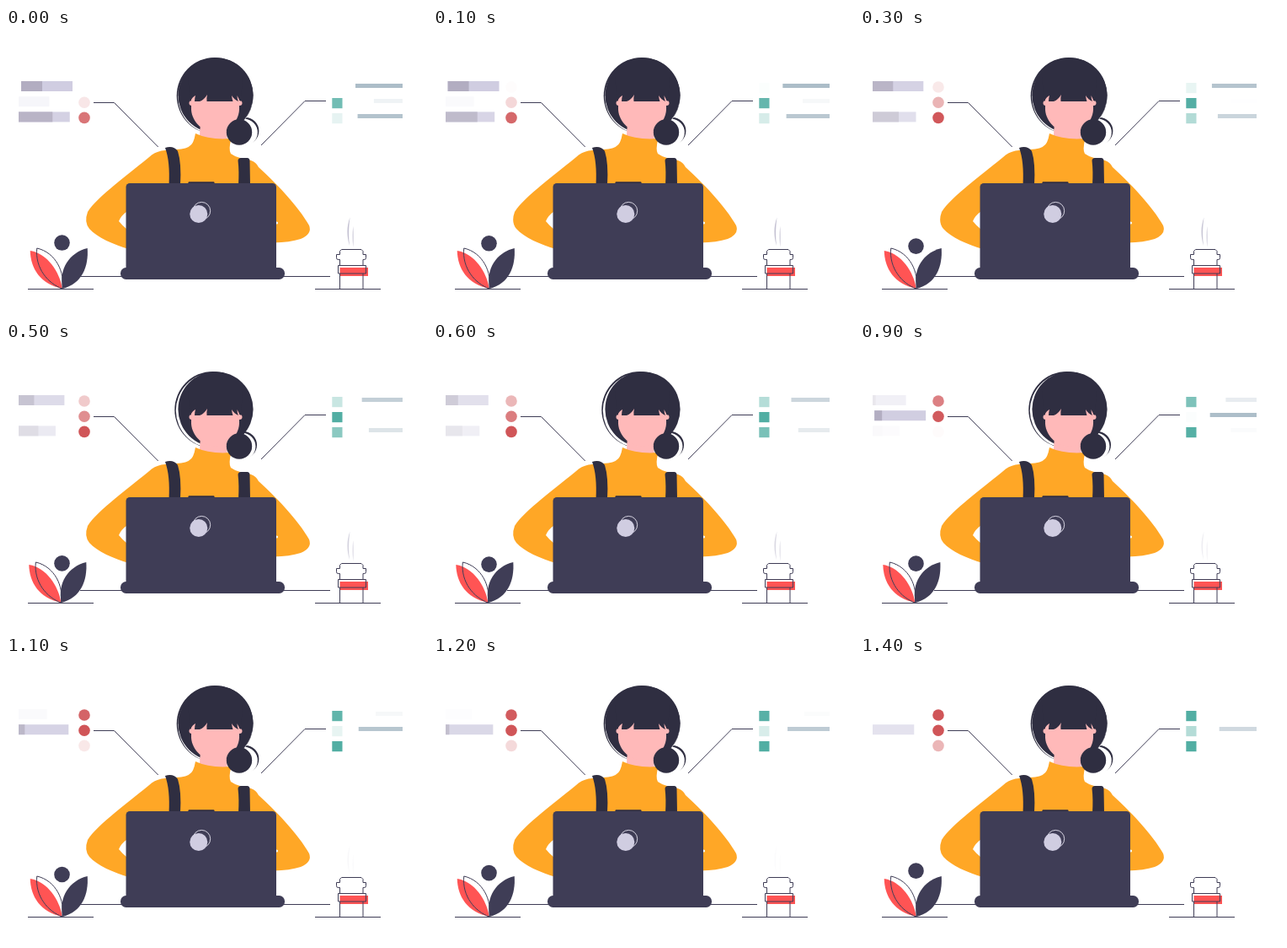
Animation, 500 px wide and 339 px high, one loop 1500 ms. Source, as an HTML page:

```html
<!DOCTYPE html>
<html lang="en">
<head>
<meta charset="utf-8">
<title>Working at a laptop</title>
<style>
html, body { margin: 0; width: 100%; height: 100%; overflow: hidden; background: #fff; }
svg { display: block; width: 100vw; height: 100vh; }
.line { fill: none; stroke: #3f3d56; stroke-width: 1; }
.ink { fill: #3f3d56; }
.hair { fill: #2f2e41; }
.skin { fill: #ffb9b9; }
.white { fill: #fff; }
.red { fill: #ff5454; }
</style>
</head>
<body>
<svg viewBox="0 0 500 339" preserveAspectRatio="none">
  <defs><clipPath id="edge"><rect x="15" y="50" width="80" height="80"/></clipPath></defs>

  <path class="line" d="M88 294.5H385M26 309.5H104M367 309.5H445"/>
  <path class="line" d="M104 88.5H128.5L180.7 141M380 86.5H355L303 139"/>
  <g id="left" clip-path="url(#edge)"></g>
  <g id="right"></g>
  <g id="icons"></g>

  <!-- loose outline behind hair and bun -->
  <g id="shade">
    <circle class="hair" cx="284" cy="122" r="16"/>
    <circle class="white" cx="282.4" cy="123.8" r="16"/>
    <circle class="hair" cx="247.7" cy="80.3" r="45.4"/>
    <circle class="white" cx="248.3" cy="81.2" r="44.5"/>
  </g>
  <circle class="hair" cx="249" cy="79.8" r="44.6"/>

  <path class="skin" d="M231 112L229.5 134H263L261 112Z"/>
  <path class="skin" d="M220 78V97C221 112 235 124 249 124S276 112 277 97V78Z"/>
  <circle class="skin" cx="220.5" cy="89" r="3"/>
  <circle class="skin" cx="277.5" cy="89" r="3"/>
  <path class="hair" d="M216 58H281L279 87Q276 84 274.5 80Q274.500 84 276 87Q271 85 268 80Q268.500 84 269.500 87H238.5Q238 83 239 79Q235 85.5 230 87H224Q224 83 225 80Q221 82 219 87Z"/>

  <path fill="#ffa726" d="M225 125Q242 133 267.5 131Q264 144 267 149Q271 152 278 154L291 157Q297 159 300 165C318 181 348 212 360 234Q364 244 350 250Q337 254 318 254.5V270H146V262C128 257 108 248 99 238Q92.500 230 97 218C108 200 147 172.500 173 150.500Q180 145.500 189 145L208 143.500Q219 142 222 135.500Q224 131 225 125Z"/>
  <path class="white" d="M143 218Q137 222 134 229Q138 234 143 238Z"/>
  <circle class="white" cx="321.5" cy="231" r="1.5"/>
  <circle class="hair" cx="277" cy="123.5" r="15.2"/>

  <path class="hair" d="M189 142Q199 139 204 146Q208.5 160 207 186H193.5Q195 158 189 142Z"/>
  <path class="hair" d="M275.5 157Q276 154 279 154H286.5Q289 154 289.5 157L290 186H276Q277 170 275.5 157Z"/>

  <rect class="hair" x="216.5" y="182.3" width="31" height="4" rx="1"/>
  <rect class="ink" x="142.5" y="184" width="178.5" height="112" rx="4.5"/>
  <rect class="ink" x="136" y="284" width="195" height="14" rx="6.5"/>
  <circle cx="232.3" cy="216.8" r="10.4" fill="none" stroke="#e6e4f0" stroke-width=".9"/>
  <circle cx="228.8" cy="220.5" r="10.5" fill="#d0cde1"/>

  <g id="plant">
    <path class="red" d="M28.5 264C29 285 40 303 66.5 309C64 290 49 267 28.5 264Z"/>
    <path class="line" d="M36.5 261C34 285 50 303 66.5 309C70 290 59 266 36.5 261Z"/>
    <path class="ink" d="M96.5 261C75 266 62 286 67 309C90 303 98 283 96.5 261Z"/>
  </g>
  <circle id="dot" class="ink" cx="66.5" r="9.3"/>

  <rect class="red" x="396.5" y="284" width="33.5" height="10"/>
  <path class="line" d="M396.500 281.500V274.500H394.500Q392.500 274.500 392.500 272.500V268.500H396.500V264.500L398.500 262.500H422L424 264.500V268.500H427.500V272.500Q427.500 274.500 425.500 274.500H424V281.500M394.500 281.500H427.500V291H394.500ZM396.500 291V309M424 291V309"/>
  <g id="steam" fill="#b9b6ca">
    <path d="M408.500 224.500C404 236 405 249 408 258C406.500 246 407 236 408.500 224.500Z"/>
    <path opacity=".6" d="M412.500 235C410.500 245 411.500 253 412.500 260C413.200 252 413.300 244 412.500 235Z"/>
  </g>
</svg>
<script>
const LOOP = 1500, STEP = 100;
const SLIDE = 1400, CYCLE = 1760;   // one row glides for SLIDE, then restarts after CYCLE

const $ = id => document.getElementById(id);

function set(el, attrs) {
  for (const key in attrs) el.setAttribute(key, attrs[key]);
}

function add(parent, tag, attrs = {}) {
  const el = document.createElementNS("http://www.w3.org/2000/svg", tag);
  set(el, attrs);
  return parent.appendChild(el);
}

// Sine ease in and out, 0 to 1, for a row that is ahead by the given lead.
function progress(t, lead) {
  const s = Math.min((t + lead) % CYCLE, SLIDE);
  return (1 - Math.cos(Math.PI * s / SLIDE)) / 2;
}

// Each row: width of its dark part, then the leads of its bars, circle and square.
const rows = [
  { split: 25, bar: 0, circle: 30, square: 30 },
  { split: 9, bar: 1000, circle: 350, square: 1000 },
  { split: 40.5, bar: 280, circle: 1000, square: 350 }
].map((row, i) => {
  const y = 63 + 18.2 * i;
  const left = add($("left"), "g");
  add(left, "rect", { x: 18, y, width: 61, height: 12, fill: "#d0cde1" });
  add(left, "rect", { x: 18, y, width: row.split, height: 12, fill: "#b2adc1" });
  const right = add($("right"), "rect", { y: 66 + 18 * i, height: 5, fill: "#acbdc8" });
  const circle = add($("icons"), "circle", { cx: 93, cy: y + 7, r: 6.8, fill: "#d05558" });
  const square = add($("icons"), "rect", { x: 387.3, y: 65 + 18 * i, width: 12.2, height: 12.2, fill: "#52aea3" });

  return t => {
    const p = progress(t, row.bar), x = 415 + 27 * p;
    set(left, { transform: `translate(${-34 * p} 0)`, opacity: 1 - p });
    set(right, { x, width: 471 - x, opacity: 1 - p });
    set(circle, { opacity: progress(t, row.circle) });
    set(square, { opacity: progress(t, row.square) });
  };
});

function draw(t) {
  rows.forEach(update => update(t));
  const dip = Math.cos(2 * Math.PI * (t - 710) / LOOP);
  const sway = dip > 0 ? -2 : .4;
  set($("dot"), { cy: 259.3 + 4.8 * dip });
  set($("shade"), { transform: `translate(${sway} 0)` });
  set($("plant"), { transform: `translate(${.6 * sway} 0)` });
  set($("steam"), { opacity: .85 * (1 - progress(t, 0)) });
}

const start = performance.now();
function tick() {
  const t = (performance.now() - start) % LOOP;
  draw(Math.floor(t / STEP) * STEP);
  requestAnimationFrame(tick);
}
tick();
</script>
</body>
</html>
```
